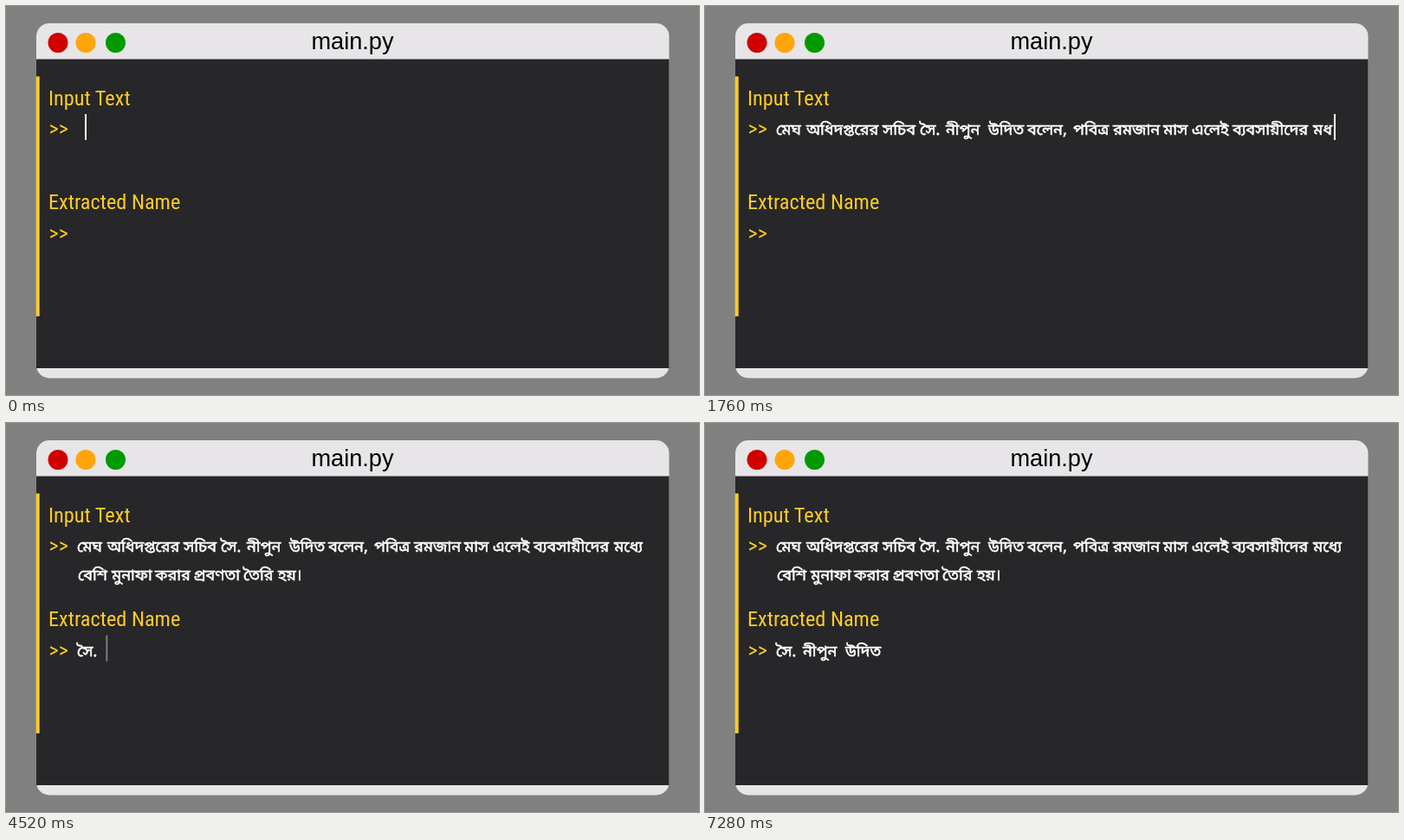
Animation, 800 px wide and 450 px high, one loop 7560 ms. Source, as an HTML page:

```html
<!DOCTYPE html>
<html lang="bn">
<head>
<meta charset="utf-8">
<title>main.py</title>
<style>
html, body { margin: 0; width: 100%; height: 100%; overflow: hidden; background: #808080; }
svg { display: block; width: 100vw; height: 100vh; }
.title { font: 27.2px "Liberation Sans", Arial, sans-serif; text-anchor: middle; }
.label { font: 24.3px "Roboto Condensed", Roboto, sans-serif; font-stretch: condensed; fill: #ffcc26; }
.typed { font: 18px "Noto Sans Bengali", "Noto Sans", sans-serif; fill: #fff; stroke: #fff; stroke-width: .6; }
</style>
</head>
<body>
<svg viewBox="0 0 800 450">
  <rect width="800" height="450" fill="#808080"/>
  <rect x="35" y="20" width="730.5" height="410.5" rx="15" fill="#e7e5e8"/>
  <rect x="35" y="61.5" width="730.5" height="357.5" fill="#272729"/>
  <circle cx="60" cy="42.5" r="11.5" fill="#d00000"/>
  <circle cx="92" cy="42.5" r="11.5" fill="#ffa50a"/>
  <circle cx="126.5" cy="42.5" r="11.5" fill="#009a00"/>
  <text class="title" x="400" y="49.5">main.py</text>
  <rect x="34.7" y="81.5" width="4" height="277.5" fill="#ffcc26"/>
  <g class="label">
    <text x="49" y="114.5">Input Text</text>
    <text x="49.5" y="149.5">&gt;&gt;</text>
    <text x="49" y="235">Extracted Name</text>
    <text x="49.5" y="270.5">&gt;&gt;</text>
  </g>
  <g class="typed" id="words"></g>
  <rect id="caret" width="2" height="30" fill="#fff"/>
</svg>
<script>
const LOOP = 7560, STEP = 40;
const layer = document.getElementById("words");
const caret = document.getElementById("caret");

// Builds one <text> per word; start counts characters before it.
function makeEntry(lines, keys) {
  const words = [];
  let start = 0;
  for (const { y, xs, text } of lines) {
    text.normalize().split(" ").forEach((word, i) => {
      const node = document.createElementNS("http://www.w3.org/2000/svg", "text");
      node.setAttribute("x", xs[i]);
      node.setAttribute("y", y);
      layer.append(node);
      words.push({ node, word, start, x: xs[i], y });
      start += word.length + 1;
    });
  }
  return { words, keys };
}

// Keys are [time, characters typed].
const input = makeEntry([
  { y: 149, xs: [82, 117, 205, 248, 278, 327, 372, 425, 471, 529, 562, 609, 702],
    text: "মেঘ অধিদপ্তরের সচিব সৈ. নীপুন উদিত বলেন, পবিত্র রমজান মাস এলেই ব্যবসায়ীদের মধ্যে" },
  { y: 182, xs: [83, 122, 172, 217, 274, 314], text: "বেশি মুনাফা করার প্রবণতা তৈরি হয়।" }
], [[60, 0], [680, 28], [720, 30], [820, 30], [1360, 59], [1560, 67],
    [2200, 104], [2280, 107], [2380, 107], [2560, 116]]);

const output = makeEntry([
  { y: 269.5, xs: [82, 113, 162], text: "সৈ. নীপুন উদিত" }
], [[3640, 0], [3960, 3], [4100, 3], [4120, 4], [4640, 4], [5080, 10], [5600, 10], [5920, 14]]);

// The caret fades out after each pause, until typing resumes.
const fades = [[2880, 3440], [4440, 4640], [5400, 5600], [6240, LOOP]];

function typedCount(keys, t) {
  if (t <= keys[0][0]) return 0;
  for (let i = 1; i < keys.length; i++) {
    const [t0, n0] = keys[i - 1], [t1, n1] = keys[i];
    if (t <= t1) return Math.floor(n0 + (n1 - n0) * (t - t0) / (t1 - t0) + 1e-6);
  }
  return keys[keys.length - 1][1];
}

// Shows the typed part and returns the caret position.
function type({ words, keys }, t) {
  const count = typedCount(keys, t);
  let spot = { x: words[0].x + 9, y: words[0].y - 24 };
  for (const { node, word, start, x, y } of words) {
    const shown = word.slice(0, Math.max(0, count - start));
    if (node.textContent !== shown) node.textContent = shown;
    if (shown) {
      const gap = count > start + word.length ? 10 : 2;
      spot = { x: x + node.getComputedTextLength() + gap, y: y - 24 };
    }
  }
  return spot;
}

function caretOpacity(t) {
  if (t >= 3440 && t < 3640) return Math.min(1, (t - 3400) / 200);
  const fade = fades.find(([from, to]) => t >= from && t < to);
  return fade ? Math.max(0, 1 - (t - fade[0] + STEP) / 200) : 1;
}

function draw(now) {
  const t = Math.floor((now % LOOP) / STEP + 1e-6) * STEP;
  const first = type(input, t), second = type(output, t);
  const spot = t < 3440 ? first : second;
  caret.setAttribute("x", spot.x);
  caret.setAttribute("y", spot.y);
  caret.setAttribute("opacity", caretOpacity(t));
}

const begin = performance.now();
function tick() {
  draw(performance.now() - begin);
  requestAnimationFrame(tick);
}
tick();
</script>
</body>
</html>
```
